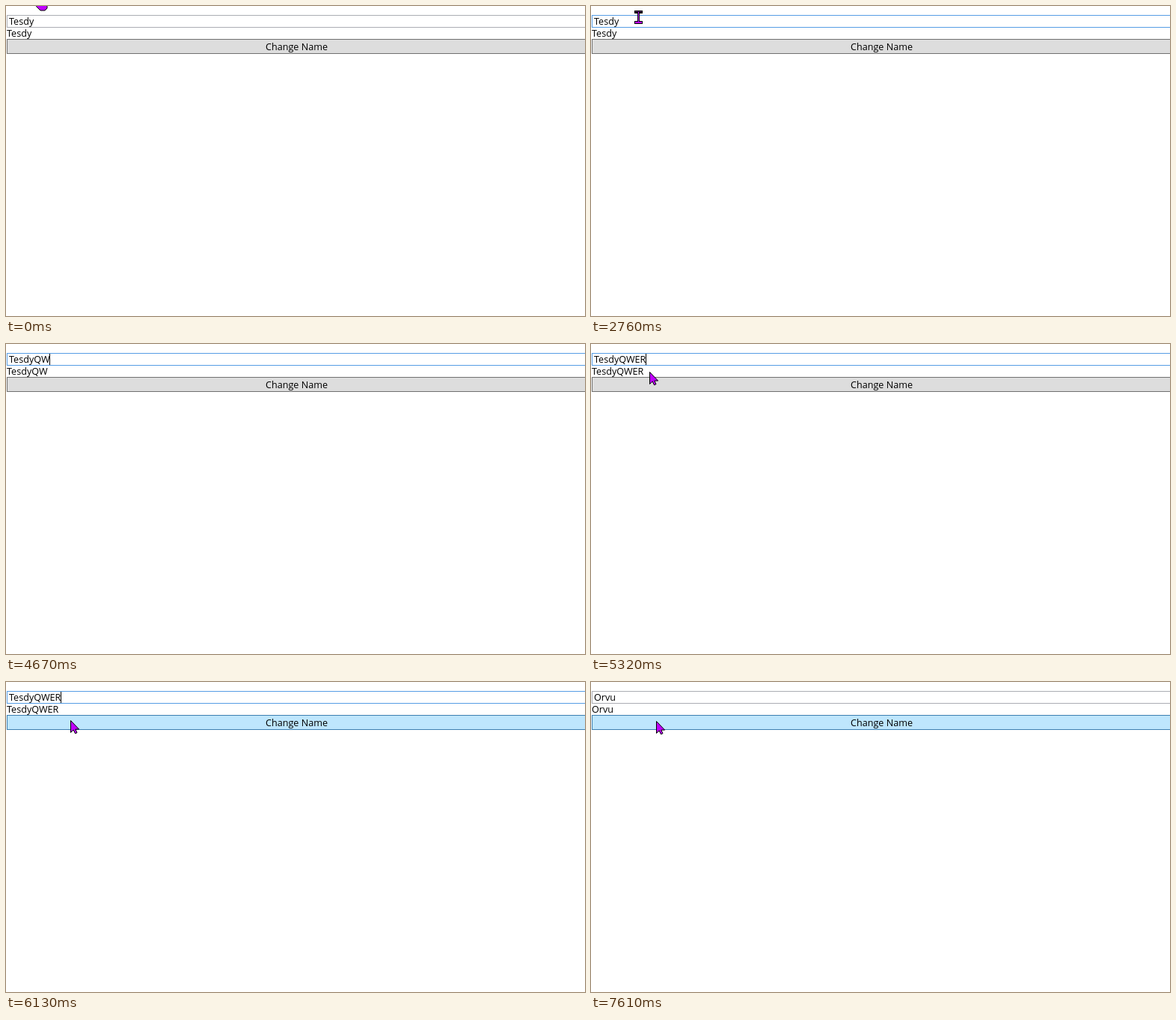
An HTML page that plays this animation: 774 px wide and 414 px high, repeating every 8 s.

```html
<!DOCTYPE html>
<html lang="en">
<head>
<meta charset="utf-8">
<title>Change Name</title>
<style>
  html, body { margin: 0; width: 100%; height: 100%; overflow: hidden; background: #fff; }
  svg { display: block; }
  text { font: 12.6px "Open Sans", "Noto Sans", sans-serif; fill: #000; }
  .box { stroke-width: 1; shape-rendering: crispEdges; }
</style>
</head>
<body>
<svg width="774" height="414" viewBox="0 0 774 414">
  <rect id="field" class="box" x="1.5" y="12.5" width="790" height="16" fill="#fff"/>
  <text id="fieldText" x="4" y="25"></text>
  <rect id="caret" x="36" y="13" width="1" height="15" shape-rendering="crispEdges"/>
  <text id="label" x="1" y="41"></text>
  <rect id="button" class="box" x="1.5" y="44.5" width="790" height="19"/>
  <text x="388.5" y="59" text-anchor="middle">Change Name</text>
  <g id="hand">
    <path d="M-7.5 -4V0.5L-2 6H4L7 3V-4Z" fill="#bf00ff" stroke="#000"/>
  </g>
  <g id="arrow">
    <path d="M.5 .5V16.5L4.2 13L6.5 17.8L9 16.7L6.8 12.1H11.6Z" fill="#bf00ff" stroke="#000"/>
  </g>
  <g id="beam" shape-rendering="crispEdges">
    <path d="M-5 -9H6V-5H2V5H6V9H-5V5H-1V-5H-5Z" fill="#000"/>
    <path d="M-4 -8H5V-7H-4Z" fill="#4b1260"/>
    <path d="M0 -7H1V6H5V8H-4V6H0Z" fill="#bf00ff"/>
  </g>
</svg>
<script>
const LOOP = 8000;
const FIRST = "Tesdy", SECOND = "Orvu";
const el = id => document.getElementById(id);
const shapes = ["hand", "arrow", "beam"];

// [start, shape, x, y]
const pointer = [
  [0, "hand", 48, 0],
  [90, "arrow", 50, -6], [180, "arrow", 54, 0], [270, "arrow", 57, 3],
  [360, "arrow", 59, 6], [450, "arrow", 60, 8], [570, "arrow", 61, 9],
  [930, "beam", 62, 15], [1200, "beam", 63, 15],
  [3750, "none", 0, 0],
  [5030, "beam", 66, 17], [5140, "arrow", 75, 31], [5230, "arrow", 77, 34],
  [5320, "arrow", 78, 37], [5410, "arrow", 80, 39], [5500, "arrow", 81, 40],
  [5590, "arrow", 82, 41], [6040, "arrow", 84, 47],
  [6130, "arrow", 86, 51], [6220, "arrow", 87, 52]
];
const names = [
  [0, FIRST, 36], [3840, FIRST + "Q", 46], [4490, FIRST + "QW", 58],
  [4760, FIRST + "QWE", 65], [4940, FIRST + "QWER", 73], [7610, SECOND, 32]
];
const borders = [[0, "#abadb3"], [930, "#7eb4ea"], [1290, "#569de5"], [7520, "#abadb3"]];
const buttons = [
  [0, "#dddddd", "#707070"], [6040, "#bee6fd", "#3c7fb1"],
  [7520, "#c4e5f6", "#2c628b"], [7610, "#bee6fd", "#3c7fb1"]
];
const carets = [
  [0, false], [1290, true], [1770, false], [2220, true], [2760, false], [3300, true],
  [5500, false], [6040, true], [6600, false], [7140, true], [7520, false]
];

// Last entry of a timeline that has started by time t
const at = (timeline, t) => timeline.filter(entry => entry[0] <= t).pop();
const show = (node, on) => node.setAttribute("visibility", on ? "visible" : "hidden");

function render(t) {
  const [, name, caretX] = at(names, t);
  el("fieldText").textContent = name;
  el("label").textContent = name;
  el("caret").setAttribute("x", caretX);
  show(el("caret"), at(carets, t)[1]);

  el("field").setAttribute("stroke", at(borders, t)[1]);
  const [, fill, stroke] = at(buttons, t);
  el("button").setAttribute("fill", fill);
  el("button").setAttribute("stroke", stroke);

  const [, shape, x, y] = at(pointer, t);
  for (const id of shapes) {
    show(el(id), id === shape);
    el(id).setAttribute("transform", `translate(${x} ${y})`);
  }
}

const start = performance.now();
function tick() {
  render((performance.now() - start) % LOOP);
  requestAnimationFrame(tick);
}
tick();
</script>
</body>
</html>
```
